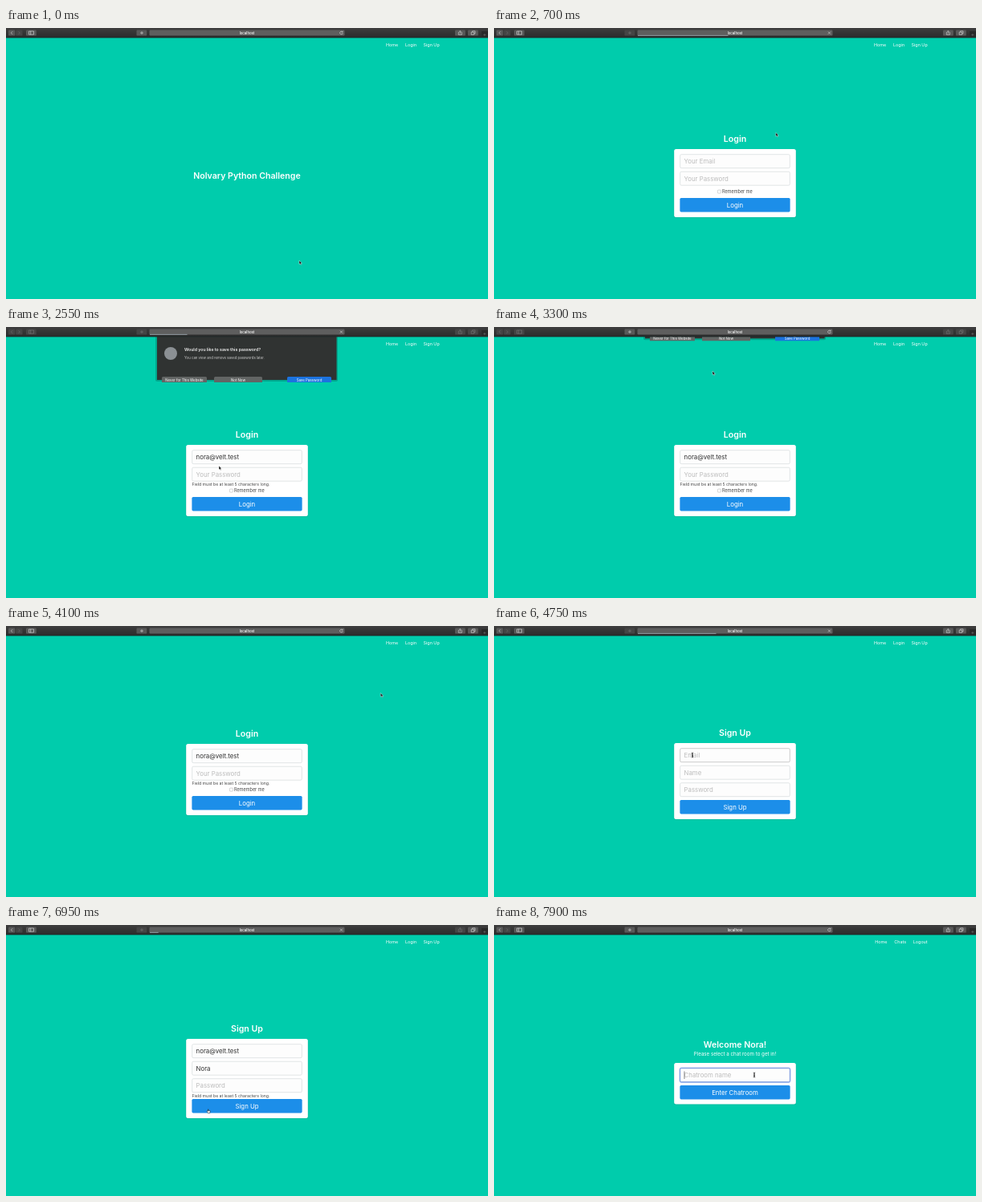
Recreate the animation shown at these times as an HTML page. Size 600 by 338 pixels, loop 8 s.

```html
<!DOCTYPE html>
<html lang="en">
<head>
<meta charset="utf-8">
<title>Login and sign up</title>
<style>
  html, body { margin: 0; width: 100%; height: 100%; overflow: hidden; background: #00ccac; }
  svg { display: block; width: 100vw; height: 100vh; }
  text { font-family: Inter, "Open Sans", sans-serif; white-space: pre; }
</style>
</head>
<body>
<svg id="stage" viewBox="0 0 600 338">
  <defs>
    <linearGradient id="chrome" x2="0" y2="1">
      <stop stop-color="#3e3e3e"/><stop offset="1" stop-color="#2b2b2b"/>
    </linearGradient>
    <g id="arrow"><path d="M0 0V4.6L1.1 3.7 1.9 5.3 2.8 4.9 2.1 3.3H3.4Z" fill="#111" stroke="#fff" stroke-width=".4"/></g>
    <g id="hand"><path d="M-.5-2.2V.4L-1.6-.2-2 .5-.4 2.7H1.7L2.2-.1-.1-.7V-2.2Z" fill="#fff" stroke="#111" stroke-width=".5"/></g>
    <g id="beam"><path d="M-1.2-3Q0-3 0-2V2Q0 3-1.2 3M1.2-3Q0-3 0-2V2Q0 3 1.2 3M-.7 .8H.7" fill="none" stroke="#222" stroke-width=".7"/></g>
  </defs>
  <g id="scene"></g>
</svg>
<script>
const LOOP = 8000, STEP = 50;
const EMAIL = 'nora@velt.test', NAME = 'Nora';
const INPUT_SIZE = 7.8;
const scene = document.getElementById('scene');
const pen = document.createElement('canvas').getContext('2d');

// Pointer path: time, x, y, shape ('' = hidden while typing)
const POINTER = [
  [0, 365, 290, 'arrow'], [50, 365, 290, 'arrow'], [400, 503, 21, 'hand'], [550, 503, 21, 'arrow'],
  [750, 300, 167, 'beam'], [900, 300, 167, ''],
  [2150, 300, 187, 'arrow'], [2250, 262, 224, 'hand'], [2400, 262, 224, 'arrow'],
  [2900, 272, 55, 'arrow'], [3300, 272, 55, 'arrow'], [3700, 360, 188, 'arrow'], [3850, 360, 188, 'arrow'],
  [4250, 530, 21, 'hand'], [4450, 530, 21, 'arrow'], [4650, 300, 248, 'arrow'], [4750, 247, 161, 'beam'],
  [5050, 247, 161, ''], [6700, 247, 205, 'arrow'], [6800, 252, 232, 'hand'], [6950, 252, 232, 'hand'],
  [7050, 262, 200, 'beam'], [7150, 262, 200, ''], [7400, 262, 200, 'arrow'], [7500, 262, 229, 'hand'],
  [7700, 262, 229, 'arrow'], [7850, 324, 187, 'beam']
];
const LOADS = [[550, 800], [2400, 2850], [4450, 5000], [6900, 7300], [7500, 7850]];
const SHEET = [[2250, 0], [2400, 54], [3150, 54], [3300, 2.3], [3350, 0]];

const within = (t, from, to) => t >= from && t < to;

// Linear interpolation along [time, ...values] points
function at(points, t) {
  const i = points.findLastIndex(p => p[0] <= t);
  if (i < 0) return points[0].slice(1);
  const a = points[i], b = points[i + 1];
  if (!b) return a.slice(1);
  const k = (t - a[0]) / (b[0] - a[0]);
  return a.slice(1).map((v, j) => typeof v === 'number' ? v + (b[j + 1] - v) * k : v);
}
const typed = (text, t, points) => text.slice(0, Math.round(at(points, t)[0]));
const dots = (t, from, to, n) => typed('•'.repeat(n), t, [[from, 0], [to, n]]);

const rect = (x, y, w, h, fill, extra = '') =>
  `<rect x="${x}" y="${y}" width="${w}" height="${h}" fill="${fill}" ${extra}/>`;
const line = (d, color = '#ddd', width = .6) =>
  `<path d="${d}" fill="none" stroke="${color}" stroke-width="${width}"/>`;
// y is the vertical middle of the capitals
const label = (s, x, y, size, fill = '#fff', anchor = 'middle', weight = 400) =>
  `<text x="${x}" y="${y + size * .36}" font-size="${size}" fill="${fill}" text-anchor="${anchor}" font-weight="${weight}">${s}</text>`;
const title = (s, y) => label(s, 300, y, 10.6, '#fff', 'middle', 600);

function toolbar(t) {
  const load = LOADS.find(([a, b]) => within(t, a, b));
  const progress = load ? ((t - load[0]) / (load[1] - load[0])) ** 1.5 : 0;
  const sheetOpen = within(t, 2300, 3350);
  const button = (x, w, icon, dim) =>
    rect(x, 2.6, w, 7, dim ? '#454545' : '#595959', 'rx="1.2"') +
    `<g opacity="${dim ? .3 : 1}">${line(icon)}</g>`;
  return rect(0, 0, 600, 12, 'url(#chrome)') + rect(0, 11.6, 600, .8, '#1c2a28') +
    button(3, 8.3, 'M8 4.3L6.3 6.1 8 7.9', sheetOpen) +
    button(12.2, 8.3, 'M15.6 4.3L17.3 6.1 15.6 7.9', true) +
    button(25, 12.8, 'M28.5 4H34.5V8.2H28.5ZM30.6 4V8.2', sheetOpen) +
    button(162.5, 12.8, 'M167 6.1H171M169 4.2V8', !!load) +
    rect(178.5, 2.6, 243, 7, '#5e5e5e', 'rx="1.3"') +
    (load ? rect(179, 8.9, 242 * progress, .8, '#a0adb5') : '') +
    label('localhost', 300, 6, 4.3, '#fff', 'middle', 500) +
    (load ? line('M415.9 4.6L418.9 7.6M418.9 4.6L415.9 7.6')
          : line('M418.7 4.8A1.8 1.8 0 1 0 419.2 6.3M419 3.7V5.1H417.6')) +
    button(559, 12.8, 'M564 5.4H563.3V8.4H567.3V5.4H566.6M565.3 7V3.6M564.2 4.6L565.3 3.5 566.4 4.6', sheetOpen || load && progress < .1) +
    button(575, 12.8, 'M579.2 5.2H582.6V8.3H579.2ZM580.6 5V3.8H584V7H582.8', sheetOpen) +
    rect(592, 4, 8, 8, '#292929') + line('M594.2 8.6H597.4M595.8 7V10.2', '#777', .5);
}

function sheet(t) {
  const h = at(SHEET, t)[0];
  if (h <= 0) return '';
  const y = h - 42;
  const choice = (s, x, w, fill) => rect(x, y + 38, w, 8, fill, 'rx="1.5"') + label(s, x + w / 2, y + 42, 4.4);
  return `<svg y="12" width="600" height="${h + 3}">` +
    rect(186, -4, 227, h + 6, '#000', 'opacity=".18" rx="2"') +
    rect(188, -2, 223.5, h + 2, '#303332') +
    `<circle cx="205" cy="${y + 9}" r="8" fill="#8b9094"/>` +
    label('Would you like to save this password?', 222, y + 4, 5.2, '#eee', 'start', 600) +
    label('You can view and remove saved passwords later.', 222, y + 14, 4.3, '#ccc', 'start') +
    choice('Never for This Website', 194, 56, '#626564') +
    choice('Not Now', 259, 60, '#626564') +
    choice('Save Password', 350, 55, '#1b73df') + '</svg>';
}

function nav(items) {
  return items.map(([s, x]) => label(s, x, 20.8, 5.4, '#fff', 'start')).join('');
}

function field(y, { hint, value = '', focus, icon, hover }) {
  const mid = y + 9;
  const isSecret = value[0] === '•';
  const size = isSecret ? 5.5 : INPUT_SIZE;
  pen.font = `${size}px Inter, "Open Sans", sans-serif`;
  const caretX = 237 + pen.measureText(value).width;
  const border = focus ? '#4470d2' : hover ? '#b5b5b5' : '#d5dadb';
  return (focus ? rect(231, y - .5, 138, 18.5, 'none', 'rx="2" stroke="#a9c0f2" stroke-width="1"') : '') +
    rect(231.7, y + .2, 136.6, 17, '#fdfdfd', `rx="1.6" stroke="${border}" stroke-width=".7"`) +
    label(value || hint, 236.6, mid, size, value ? '#303030' : '#bcbcbc', 'start') +
    (focus ? line(`M${caretX} ${y + 4}V${y + 13.5}`, '#333', .6) : '') +
    (focus && icon ? fieldIcon(icon, mid) : '');
}

function fieldIcon(kind, y) {
  const mark = kind === 'key'
    ? `<circle cx="357.8" cy="${y - 1.2}" r="1.6" fill="#222"/>` + line(`M357.8 ${y}V${y + 2.2}`, '#222', 1)
    : `<circle cx="356.5" cy="${y}" r="2" fill="none" stroke="#333" stroke-width=".6"/><circle cx="356.5" cy="${y}" r=".9" fill="#333"/>`;
  return mark + line(`M360.2 ${y - .4}L361.4 ${y + .4} 362.6 ${y - .4}`, '#333', .6);
}

function form({ heading, y, fields, help, remember, action }) {
  const top = y + 13;
  let below = top + 6.5 + fields.length * 21.5;
  let body = fields.map((f, i) => field(top + 6.5 + i * 21.5, f)).join('');
  if (help) {
    body += label('Field must be at least 5 characters long.', 231.5, below - .3, 5.15, '#444', 'start');
    below += 4;
  }
  if (remember) {
    body += rect(278.4, below + 1.6, 4, 4, '#fff', 'rx=".7" stroke="#aaa" stroke-width=".5"') +
      label('Remember me', 284, below + 3.7, 5.5, '#444', 'start');
    below += 11.5;
  }
  return title(heading, y) + card(top, below + 24 - top) + body + submit(action, below);
}
const card = (y, h) => rect(223.7, y + .8, 152.6, h, '#087d69', 'rx="2.5" opacity=".25"') +
  rect(224.2, y, 151.6, h, '#fff', 'rx="2.5"');
const submit = (s, y) => rect(231.4, y, 137.2, 17.4, '#1c8ee9', 'rx="1.6"') + label(s, 300, y + 8.9, INPUT_SIZE);

function page(t) {
  if (t < 700) return title('Nolvary Python Challenge', 184);

  if (t < 4500) {
    const failed = t >= 2450;
    return form({
      heading: 'Login', y: failed ? 134 : 138, help: failed, remember: true, action: 'Login',
      fields: [
        { hint: 'Your Email', value: typed(EMAIL, t, [[850, 0], [1450, EMAIL.length]]), focus: within(t, 750, 1600), icon: 'person' },
        { hint: 'Your Password', value: failed ? '' : dots(t, 1950, 2150, 4), focus: within(t, 1600, 2300), icon: 'key' }
      ]
    });
  }

  if (t < 7700) {
    const failed = t >= 6950;
    const emailKeys = [[5000, 0], [5050, 1], [5150, 1], [5500, 5], [5600, 5], [5850, EMAIL.length]];
    return form({
      heading: 'Sign Up', y: failed ? 129 : 133, help: failed, action: 'Sign Up',
      fields: [
        { hint: 'Email', value: typed(EMAIL, t, emailKeys), focus: within(t, 4800, 6000), icon: 'person', hover: within(t, 4700, 4800) },
        { hint: 'Name', value: typed(NAME, t, [[6100, 0], [6300, 4]]), focus: within(t, 6000, 6350), icon: 'person' },
        { hint: 'Password', value: failed ? dots(t, 7100, 7300, 6) : dots(t, 6500, 6700, 4),
          focus: within(t, 6350, 6850) || within(t, 7100, 7500), icon: 'key' }
      ]
    });
  }

  return title(`Welcome ${NAME}!`, 149.5) +
    label('Please select a chat room to get in!', 300, 160.5, 6.2) +
    card(172, 51.5) + field(178.5, { hint: 'Chatroom name', focus: true }) + submit('Enter Chatroom', 200);
}

function pointer(t) {
  const [x, y, shape] = at(POINTER, t);
  return shape ? `<use href="#${shape}" x="${x}" y="${y}"/>` : '';
}

let shown = -1;
function draw(now) {
  const t = Math.floor(now % LOOP / STEP) * STEP;
  if (t !== shown) {
    shown = t;
    const links = t < 7700
      ? [['Home', 473], ['Login', 497], ['Sign Up', 519.6]]
      : [['Home', 474.2], ['Chats', 498.3], ['Logout', 521.8]];
    scene.innerHTML = rect(0, 0, 600, 338, '#00ccac') + nav(links) + page(t) + sheet(t) + toolbar(t) + pointer(t);
  }
  requestAnimationFrame(draw);
}
draw(0);
</script>
</body>
</html>
```
